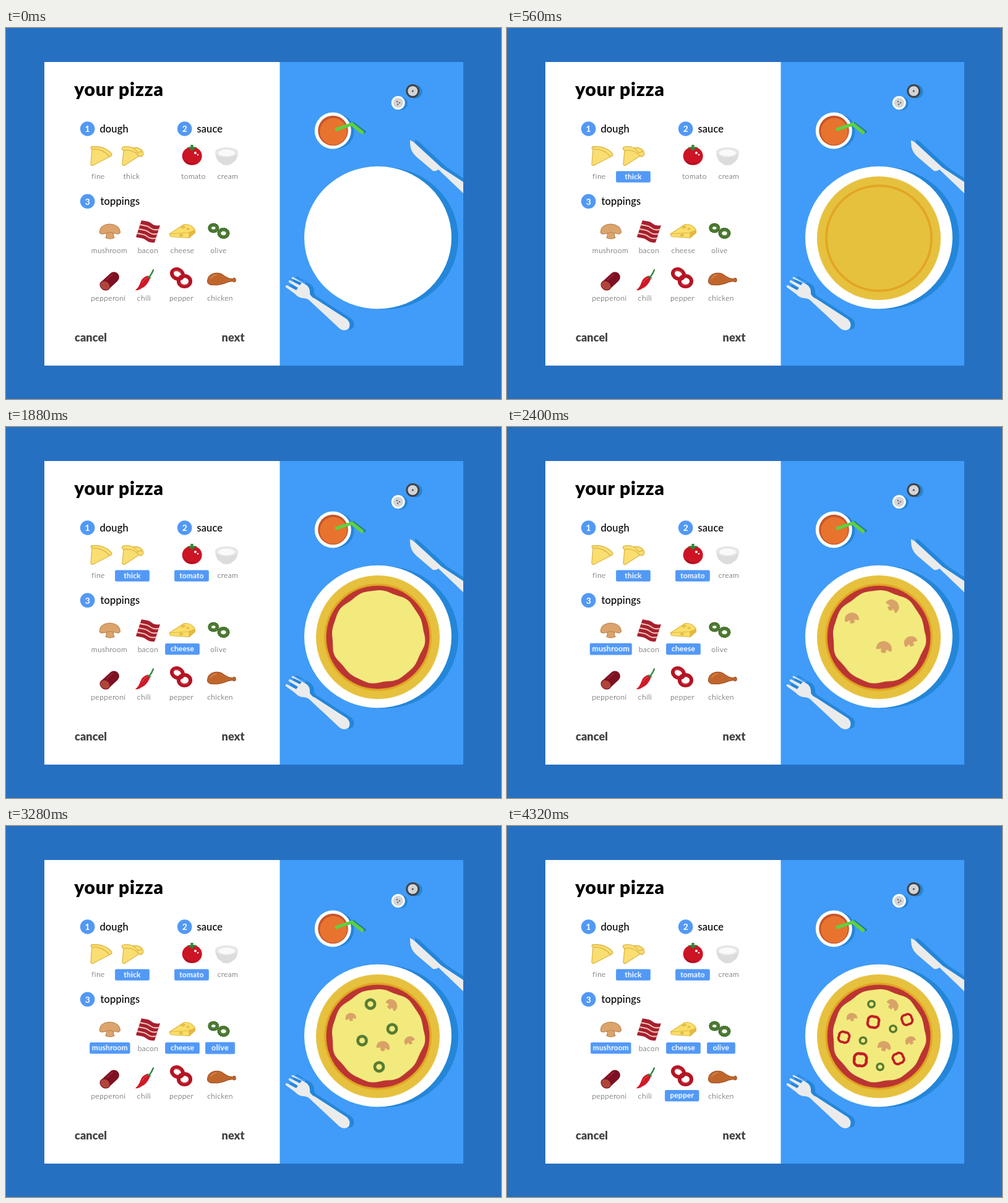
An HTML page for the animation above (5.96 s loop, 800x600 px).

```html
<!DOCTYPE html>
<html lang="en">
<head>
<meta charset="utf-8">
<title>your pizza</title>
<style>
html, body { margin: 0; width: 100%; height: 100%; overflow: hidden; background: #2670c2; }
svg { display: block; width: 800px; height: 600px; font-family: Lato, "Open Sans", sans-serif; }
.title { font-size: 30px; font-weight: 900; letter-spacing: .8px; }
.head { font-size: 16.5px; font-weight: 500; letter-spacing: .1px; }
.label { font-size: 12px; font-weight: 300; letter-spacing: .42px; fill: #333; }
.nav { font-size: 18.2px; font-weight: 900; fill: #444; }
.badge { fill: #5299f5; }
.num { font-size: 14px; font-weight: 700; fill: #fff; }
.mid, .label, .num, .btn text { text-anchor: middle; }
.btn rect { fill: #5299f7; }
.btn text { font-size: 12px; font-weight: 700; letter-spacing: .15px; fill: #fff; }
.btn { --s: 1.1; }
.shade { fill: #2486d8; }
.metal { fill: #ebebec; }
.line { fill: none; stroke-linecap: round; stroke-linejoin: round; }

/* every pick drops in from a larger size */
.drop {
  transform-box: fill-box; transform-origin: center;
  animation: 5960ms ease-in-out infinite;
}
.dough { animation-name: dough; }
.sauce { animation-name: sauce; }
.cheese { animation-name: cheese; }
.mush { animation-name: mush; }
.olive { animation-name: olive; }
.pepper { animation-name: pepper; }
@keyframes dough {
  0%, .34% { opacity: 0; transform: scale(var(--s)); }
  3.36% { opacity: 1; }
  9.4%, 100% { opacity: 1; transform: none; }
}
@keyframes sauce {
  0%, 11.74% { opacity: 0; transform: scale(var(--s)); }
  14.77% { opacity: 1; }
  19.8%, 100% { opacity: 1; transform: none; }
}
@keyframes cheese {
  0%, 22.48% { opacity: 0; transform: scale(var(--s)); }
  25.5% { opacity: 1; }
  31.54%, 100% { opacity: 1; transform: none; }
}
@keyframes mush {
  0%, 35.23% { opacity: 0; transform: scale(var(--s)); }
  38.26% { opacity: 1; }
  44.63%, 100% { opacity: 1; transform: none; }
}
@keyframes olive {
  0%, 50.34% { opacity: 0; transform: scale(var(--s)); }
  53.02% { opacity: 1; }
  59.73%, 100% { opacity: 1; transform: none; }
}
@keyframes pepper {
  0%, 61.91% { opacity: 0; transform: scale(var(--s)); }
  64.93% { opacity: 1; }
  72.32%, 100% { opacity: 1; transform: none; }
}
</style>
</head>
<body>
<svg viewBox="0 0 800 600">
  <defs>
    <clipPath id="table"><rect x="442.5" y="55" width="296.5" height="491"/></clipPath>
    <path id="knife" d="M653 181.5 Q658 183 667 192 L704 226 L742 251 V270 L699 229 Q695 232 690 231 L663 208 Q652 199 653 181.5Z"/>
    <path id="fork" d="M464 403 L486 416 Q492 421 491 430 Q493 435 500 438 L551 471 Q558 478 554 486 Q547 492 539 486 L493 443 Q488 437 481 437 Q473 437 467 430 L452 419 Q451 416 454 416 L469 424 L472 420 L457 411 Q456 408 459 408 L475 416 L478 412 L462 405 Q461 402 464 403Z"/>
    <path id="slice" d="M-9 2 Q-9 -6 0 -7 Q9 -6 9.5 2 Q9 5 6 3 L3 2.5 L3.5 6 Q0 8 -3 6 L-2.5 2.5 L-6 3.5 Q-9 5 -9 2Z" fill="#d9a268"/>
    <circle id="ring" r="5.2" fill="none" stroke="#567b33" stroke-width="3.4"/>
    <path id="lobes" class="line" stroke="#c11d27" stroke-width="3.6" d="M0 -7.6 A5.9 5.9 0 0 1 7.6 0 A5.9 5.9 0 0 1 0 7.6 A5.9 5.9 0 0 1 -7.6 0 A5.9 5.9 0 0 1 0 -7.6Z"/>
    <path id="rind" class="line" d="M219 311 C227 313 230 312 235 316 S244 320 249 319"/>
  </defs>

  <rect width="800" height="600" fill="#2670c2"/>
  <rect x="62" y="55" width="381" height="491" fill="#fff"/>
  <rect x="442.5" y="55" width="296.5" height="491" fill="#409cf8"/>

  <text class="title mid" x="182.5" y="109.5">your pizza</text>
  <circle class="badge" cx="131.7" cy="163" r="11.8"/><text class="num" x="131.5" y="168">1</text>
  <circle class="badge" cx="288.7" cy="163" r="11.8"/><text class="num" x="288.7" y="168">2</text>
  <circle class="badge" cx="131.7" cy="280.3" r="11.8"/><text class="num" x="131.7" y="285.5">3</text>
  <text class="head" x="151.5" y="169">dough</text>
  <text class="head" x="308.5" y="169">sauce</text>
  <text class="head" x="152.5" y="285.5">toppings</text>
  <text class="nav mid" x="137" y="507">cancel</text>
  <text class="nav mid" x="367" y="507">next</text>
  <g id="labels"></g>

  <!-- dough -->
  <g fill="#f9de72" stroke="#dfb643" stroke-width="1.3" stroke-linejoin="round">
    <path d="M138 192 Q160 190 171 204 Q171 207 168 208 L141 222 Q137 223 137 220 L139 196 Q136 194 138 192Z"/>
    <path fill="none" d="M139 196 Q157 195 167 208"/>
    <path d="M188 193 Q196 190 205 194 Q214 192 220 198 Q224 204 219 208 L215 207 L192 222 Q188 223 188 220 L190 198 Q186 196 188 193Z"/>
    <path fill="none" d="M190 198 Q206 196 215 207 M205 194 Q210 197 213 202 Q216 200 220 200"/>
  </g>

  <!-- tomato and cream -->
  <ellipse cx="300.7" cy="207" rx="16" ry="14.8" fill="#cc1425"/>
  <path d="M288 213 Q295 221 308 218 Q301 223 294 220 Q289 217 288 213Z" fill="#a80f20"/>
  <path d="M292 194 Q297 191 299 193 L298 189 H303 L302 193 Q306 191 309 194 Q305 194 303 196 L301 199 L298 196 Q296 194 292 194Z" fill="#2f8437"/>
  <circle cx="306" cy="202" r="2" fill="#fff"/><circle cx="310" cy="205" r="1.3" fill="#fff"/>
  <path d="M338 201 Q339 215 348 219 Q350 222 356 222 Q363 222 365 219 Q374 215 375 201Z" fill="#dcdcdd"/>
  <ellipse cx="356.5" cy="201" rx="18.5" ry="8" fill="#e6e6e6"/>
  <ellipse cx="356.5" cy="202" rx="13.5" ry="5.4" fill="#fafafa"/>

  <!-- mushroom -->
  <path d="M151.5 330 Q152 318 167.5 317 Q183 318 184.5 330 Q184 335 176 332 L173.5 332 Q173 337 175 339 Q168 343 161 339 Q163 337 162 332 Q151.5 335 151.5 330Z" fill="#dba46d" stroke="#bd8049" stroke-width="1.2"/>
  <path class="line" d="M162 332 Q168 329 174 332" stroke="#bd8049"/>

  <!-- bacon -->
  <path d="M219 311 C227 313 230 312 235 316 S244 320 249 319 L240 347 C235 347 231 347 226 343 S216 340 210 338Z" fill="#a61f2e"/>
  <g stroke="#efc4b8" stroke-width="2.2">
    <use href="#rind" x="-2.2" y="7"/><use href="#rind" x="-4.5" y="14"/><use href="#rind" x="-6.8" y="21"/>
  </g>

  <!-- cheese -->
  <g stroke="#dfb643" stroke-width="1.1" stroke-linejoin="round">
    <path fill="#f9de68" d="M264 333 L288 317.5 Q301 317 305.5 327 V331 L296 339.5 L266 337.5Z"/>
    <path fill="none" d="M264 333 L295 331 L305.5 327"/>
    <path fill="#e9b93f" d="M296 331 L305 327.5 V331 L296 339Z"/>
    <ellipse cx="286" cy="322" rx="3" ry="1.6" fill="#efc44c"/>
    <ellipse cx="283" cy="335" rx="2.3" ry="1.6" fill="#efc44c"/>
    <ellipse cx="294" cy="325" rx="2" ry="1.2" fill="#efc44c"/>
  </g>

  <!-- olives -->
  <g fill="none" stroke="#4b7a30" stroke-width="5.5">
    <ellipse cx="335.3" cy="323.5" rx="6" ry="5"/><ellipse cx="351.5" cy="332" rx="7" ry="6"/>
    <g stroke="#335c22" stroke-width="1.3" stroke-dasharray="2 1.5">
      <ellipse cx="335.3" cy="323.5" rx="8.4" ry="7.4"/><ellipse cx="351.5" cy="332" rx="9.4" ry="8.4"/>
    </g>
  </g>

  <!-- pepperoni -->
  <path class="line" d="M161 415.5 L174.5 403" stroke="#7d1023" stroke-width="17"/>
  <path class="line" d="M163 407 L172 398.5" stroke="#9c2130" stroke-width="2"/>
  <ellipse cx="160" cy="416.5" rx="8.5" ry="7" transform="rotate(35 160 416.5)" fill="#b0453b" stroke="#7d1023"/>

  <!-- chili -->
  <path d="M209 424 Q215 419 217 412 Q220 403 229 400.5 Q234 402 232 407 Q227 418 219 421 Q213 425 209 424Z" fill="#cf1926"/>
  <path class="line" d="M220 412 Q223 406 228 404" stroke="#e9555c"/>
  <path class="line" d="M229 402 L233 404 M232 402 Q236 397 238 391.5" stroke="#348743" stroke-width="2.4"/>

  <!-- pepper -->
  <g fill="none" stroke="#b51423" stroke-width="6">
    <ellipse cx="277" cy="398" rx="9.3" ry="7.5" transform="rotate(25 277 398)"/>
    <ellipse cx="288.5" cy="409.5" rx="9.6" ry="8.6"/>
    <path class="line" d="M271 393 Q276 390 283 395 M282 414 Q288 419 295 414" stroke="#dc4650" stroke-width="1"/>
  </g>

  <!-- chicken -->
  <path d="M325.500 409 Q326 399 337 396.500 Q347 395 353 401 Q360 406 367 406 Q367 403.500 369 404.500 Q372 405 371 407 Q372 410 370 410.500 Q367 411.500 366 409.500 Q359 410 352 413.500 Q342 417 331 415.500 Q325 414 325.500 409Z" fill="#c0662d" stroke="#96481c"/>
  <path class="line" d="M331 405 Q334 400 340 399" stroke="#d98a50" stroke-width="1.5"/>

  <!-- table -->
  <g clip-path="url(#table)">
    <circle class="shade" cx="638" cy="122" r="10.8"/>
    <circle cx="633.8" cy="121" r="11" fill="#fff"/><circle cx="633.8" cy="121" r="8" fill="#d3d4d6"/>
    <g fill="#666"><circle cx="632" cy="119" r="1.2"/><circle cx="636" cy="121" r="1.2"/><circle cx="633" cy="123.5" r="1.2"/></g>
    <circle class="shade" cx="662" cy="103" r="10.8"/>
    <circle cx="657.3" cy="102" r="11" fill="#3f4247"/><circle cx="657.3" cy="102" r="8" fill="#d3d4d6"/>
    <circle cx="657.3" cy="102" r="1.6" fill="#555"/>

    <circle class="shade" cx="534" cy="167" r="28.5"/>
    <circle cx="528.3" cy="166" r="29.5" fill="#fff"/>
    <circle cx="528.5" cy="166" r="24.3" fill="#c75529"/>
    <circle cx="529" cy="167.3" r="21.8" fill="#e8732f"/>
    <path d="M560 153 L581 169" stroke="#247c9c" stroke-width="4"/>
    <path d="M532 164.5 L559 155.5 L577 170" fill="none" stroke="#5ed13f" stroke-width="5.5"/>

    <use href="#knife" class="shade" x="8" y="-1"/><use href="#knife" class="metal"/>
    <ellipse class="shade" cx="612" cy="340" rx="119" ry="115"/>
    <ellipse cx="601" cy="339" rx="119" ry="115.3" fill="#fff"/>
    <use href="#fork" class="shade" x="7" y="-1"/><use href="#fork" class="metal"/>
  </g>

  <g class="drop dough" style="--s:1.1">
    <circle cx="601" cy="340" r="100" fill="#e6c13e"/>
    <circle cx="601" cy="340" r="85" fill="none" stroke="#e2a423" stroke-width="3.5"/>
  </g>
  <circle class="drop sauce" style="--s:1.25" cx="601" cy="340" r="83.5" fill="#bb3432"/>
  <path id="melt" class="drop cheese" style="--s:1.35" fill="#f3ea7d"/>
  <g id="bits"></g>
  <g id="buttons"></g>
</svg>
<script>
const $ = id => document.getElementById(id);

$('labels').innerHTML = [
  ['fine', 149, 244], ['thick', 203, 244], ['tomato', 303, 244], ['cream', 358.5, 244],
  ['mushroom', 167, 364], ['bacon', 229.5, 364], ['cheese', 285, 364], ['olive', 343.5, 364],
  ['pepperoni', 165.5, 441], ['chili', 223, 441], ['pepper', 283.5, 441], ['chicken', 346, 441]
].map(([word, x, y]) => `<text class="label" x="${x}" y="${y}">${word}</text>`).join('');

$('buttons').innerHTML = [
  ['dough', 'thick', 176, 231.5, 56], ['sauce', 'tomato', 272, 231.5, 56],
  ['cheese', 'cheese', 257, 350, 56], ['mush', 'mushroom', 135, 350, 65.5],
  ['olive', 'olive', 323, 350, 46], ['pepper', 'pepper', 255, 427, 55.5]
].map(([kind, word, x, y, w]) => `<g class="drop btn ${kind}">
  <rect x="${x}" y="${y}" width="${w}" height="18.3" rx="2.5"/>
  <text x="${x + w / 2}" y="${y + 13}">${word}</text></g>`).join('');

// kind, shape, x, y, turn, size, starting scale
const bit = ([kind, shape, x, y, turn, size, start]) =>
  `<g transform="translate(${x} ${y}) rotate(${turn}) scale(${size})">` +
  `<use class="drop ${kind}" href="#${shape}" style="--s:${start}"/></g>`;
$('bits').innerHTML = [
  ['mush', 'slice', 557, 309, -8, .95, 1.75], ['mush', 'slice', 623.5, 289, 48, 1.15, 1.3],
  ['mush', 'slice', 609.5, 356, 12, 1.17, 1.4], ['mush', 'slice', 651.5, 347, -28, .95, 1.6],
  ...[[589, 288], [624, 328], [575.5, 347], [603, 389.5]].map(p => ['olive', 'ring', ...p, 0, 1, 1.7]),
  ...[[592, 317, 10, 1.12], [646.5, 313, -20, 1.02], [544.5, 341.5, 15, 1.05], [571, 378, 5, 1.25], [632.5, 376, -25, 1.05]]
    .map(p => ['pepper', 'lobes', ...p, 1.75])
].map(bit).join('');

// gently wavy round outline
const melt = Array.from({ length: 120 }, (_, i) => {
  const a = i * Math.PI / 60;
  const r = 74.8 + .9 * Math.sin(7 * a + 1) + .8 * Math.sin(12 * a);
  return (601.3 + r * Math.cos(a)).toFixed(1) + ' ' + (339.3 + r * Math.sin(a)).toFixed(1);
});
$('melt').setAttribute('d', 'M' + melt.join('L') + 'Z');
</script>
</body>
</html>
```
